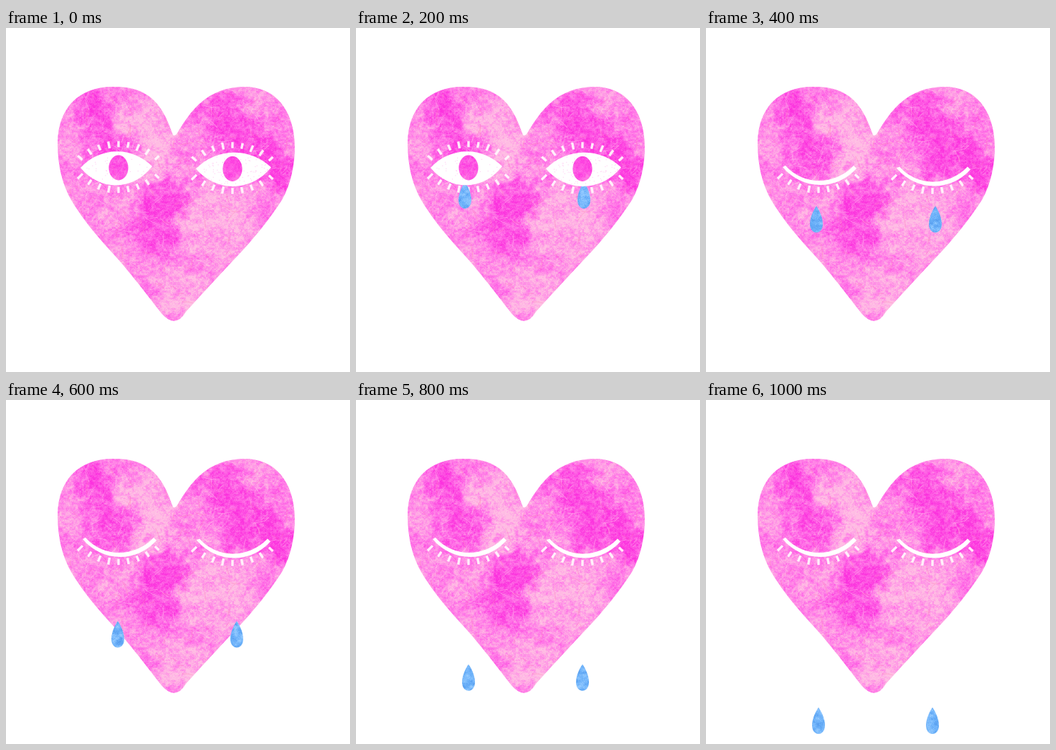
These frames come from a looping animation (480 px wide and 480 px high, 1200 ms). An HTML page with a canvas:

```html
<!DOCTYPE html>
<html lang="en">
<head>
<meta charset="utf-8">
<title>Crying heart</title>
<style>
  html, body { margin: 0; width: 100%; height: 100%; overflow: hidden; background: #fff; }
  canvas { display: block; width: 100vw; height: 100vh; }
</style>
</head>
<body>
<canvas id="stage" width="480" height="480"></canvas>
<script>
const start = performance.now();
const SIZE = 480, HOLD = 200, POSES = 6, TAU = Math.PI * 2;
const ctx = document.getElementById('stage').getContext('2d');

const HEART = new Path2D(
  'M233 149 C221 116 207 82 152 82 C103 81 73 110 72 160 C72 193 79 219 91 240 ' +
  'C108 269 132 296 154 320 C178 347 198 374 216 397 Q236 421 251 396 ' +
  'C274 370 298 345 322 319 C344 296 367 268 385 240 C398 217 403 190 403 165 ' +
  'C402 113 375 82 333 82 C279 82 256 119 240 145 Q236 152 233 149 Z');
const DROP = new Path2D('M0 0 C3 4 9 15 9 25 C9 41 -9 41 -9 25 C-9 15 -3 4 0 0 Z');
const SHUT = new Path2D('M-51.5 0 L-47.5 -2 C-23 26 21 26 47.5 -2 L51.5 2 C24 33 -24 33 -51.5 0 Z');

// x: iris, mid and half: lids, y: corner height
const EYES = [
  { x: 157, mid: 154, half: 50, y: 195, specks: 45 },
  { x: 316, mid: 317.5, half: 52.5, y: 196.5, specks: 130 }
];

// Blots of paint as x, y, radius
const HOT = [[125, 118, 27], [148, 170, 36], [222, 238, 32], [302, 120, 31],
  [335, 170, 38], [203, 286, 27], [385, 205, 25]];
const PALE = [[192, 138, 38], [205, 185, 25], [295, 272, 52], [245, 370, 34]];

const PINK = [[255, 190, 227], [255, 120, 231], [252, 50, 222]];
const BLUE = [[150, 203, 255], [106, 176, 249], [76, 146, 230]];

const mix = (a, b, t) => a + (b - a) * t;
const clamp = v => Math.min(1, Math.max(0, v));

function hash(x, y) {
  let h = Math.imul(x, 374761393) + Math.imul(y, 668265263);
  h = Math.imul(h ^ (h >>> 13), 1274126177);
  return ((h ^ (h >>> 16)) >>> 0) / 4294967296;
}

// Smooth noise from -0.5 to 0.5
function noise(x, y) {
  const i = Math.floor(x), j = Math.floor(y);
  let u = x - i, v = y - j;
  u *= u * (3 - 2 * u);
  v *= v * (3 - 2 * v);
  return mix(mix(hash(i, j), hash(i + 1, j), u), mix(hash(i, j + 1), hash(i + 1, j + 1), u), v) - .5;
}

function layer(draw) {
  const c = document.createElement('canvas');
  c.width = c.height = SIZE;
  draw(c.getContext('2d'));
  return c;
}

// Mottled paint; tone(x, y) runs from 0 (pale) to 1 (deep)
function paint(tone, ramp) {
  return layer(g => {
    const img = g.createImageData(SIZE, SIZE);
    for (let y = 0, k = 0; y < SIZE; y++) {
      for (let x = 0; x < SIZE; x++, k += 4) {
        const t = clamp(tone(x, y)) * 2, n = t < 1 ? 0 : 1;
        for (let c = 0; c < 3; c++) img.data[k + c] = mix(ramp[n][c], ramp[n + 1][c], t - n);
        img.data[k + 3] = 255;
      }
    }
    g.putImageData(img, 0, 0);
  });
}

function blots(list, x, y) {
  let sum = 0;
  for (const [bx, by, r] of list) {
    const d = ((x - bx) ** 2 + (y - by) ** 2) / (r * r);
    if (d < 2) sum += (1 - d / 2) ** 2 * (1 + d);
  }
  return Math.min(1, sum);
}

function pinkTone(x, y) {
  const wx = x + 24 * noise(x / 14, y / 14 + 50) + 8 * noise(x / 4, y / 4);
  const wy = y + 24 * noise(x / 14 + 70, y / 14) + 8 * noise(x / 4 + 30, y / 4);
  return .39 + .36 * blots(HOT, wx, wy) - .27 * blots(PALE, wx, wy)
    + .3 * noise(x / 20, y / 16) + .3 * noise(x / 7 + 9, y / 6)
    + .38 * noise(x / 2.8, y / 2.4 + 31) + .26 * (hash(x, y) - .5);
}

const blueTone = (x, y) => .4 + .7 * noise(x / 5, y / 4) + .35 * (hash(x, y) - .5);

// Thin fibres in the paper
function fibres(g) {
  g.lineWidth = .8;
  for (let i = 0; i < 420; i++) {
    const x = 70 + 335 * hash(i, 1), y = 80 + 330 * hash(i, 2);
    const a = TAU * hash(i, 3), b = a + 1.4 * hash(i, 5) - .7, r = 3 + 8 * hash(i, 4);
    g.strokeStyle = i % 3 ? 'rgba(255,210,234,.5)' : 'rgba(255,125,170,.45)';
    g.beginPath();
    g.moveTo(x, y);
    g.quadraticCurveTo(x + r * Math.cos(a), y + r * Math.sin(a),
      x + r * (Math.cos(a) + Math.cos(b)), y + r * (Math.sin(a) + Math.sin(b)));
    g.stroke();
  }
}

// Nine lashes along a parabola, fanned out from a point beyond the eye
function lashes(g, { x, y }, side) {
  const focus = y + (side < 0 ? 35 : -40);
  const reach = side < 0 ? 33 : 31;
  g.lineWidth = 3.4;
  g.strokeStyle = 'rgba(255,248,253,.92)';
  for (let i = -4; i <= 4; i++) {
    const lx = x + 13.4 * i, ly = y + side * (reach - 1.2 * i * i);
    const a = Math.atan2(ly - focus, lx - x);
    const r = 3.8 + 1.4 * hash(i + 9, reach);
    const dx = r * Math.cos(a), dy = r * Math.sin(a);
    g.beginPath();
    g.moveTo(lx - dx, ly - dy);
    g.lineTo(lx + dx, ly + dy);
    g.stroke();
  }
}

function lids({ mid, half, y }) {
  const p = new Path2D(), inner = half * .45;
  p.moveTo(mid - half, y);
  p.bezierCurveTo(mid - inner, y - 30, mid + inner, y - 30, mid + half, y - 2);
  p.bezierCurveTo(mid + inner, y + 33, mid - inner, y + 33, mid - half, y);
  return p;
}

function openEye(g, eye) {
  lashes(g, eye, -1);
  lashes(g, eye, 1);
  const iris = new Path2D(), white = lids(eye);
  iris.ellipse(eye.x, eye.y, 13.5, 17.5, 0, 0, TAU);
  white.addPath(iris);
  g.fillStyle = '#fff';
  g.fill(white, 'evenodd');
  g.fillStyle = 'rgba(252,60,222,.35)';
  g.fill(iris);
  g.save();
  g.clip(lids(eye));
  g.fillStyle = 'rgba(255,140,225,.5)';
  for (let i = 0; i < eye.specks; i++) {
    g.fillRect(eye.mid + 96 * (hash(i, 21) - .5), eye.y + 42 * (hash(i, 22) - .5), 1, 1);
  }
  g.restore();
}

function shutEye(g, eye) {
  lashes(g, eye, 1);
  g.save();
  g.translate(eye.x + 1.5, eye.y - 1);
  g.fillStyle = '#fff';
  g.fill(SHUT);
  g.restore();
}

const pink = paint(pinkTone, PINK), blue = paint(blueTone, BLUE);

function face(drawEye) {
  return layer(g => {
    g.fillStyle = '#fff';
    g.fillRect(0, 0, SIZE, SIZE);
    g.clip(HEART);
    g.drawImage(pink, 0, 0);
    fibres(g);
    EYES.forEach(eye => drawEye(g, eye));
  });
}

const awake = face(openEye), asleep = face(shutEye);

function tear(x, y, cover) {
  ctx.save();
  if (cover) {
    const below = new Path2D('M0 0H480V480H0Z');
    below.addPath(cover);
    ctx.clip(below, 'evenodd');
  }
  ctx.translate(x, y);
  ctx.clip(DROP);
  ctx.drawImage(blue, -x, -y);
  ctx.restore();
}

function frame() {
  const pose = Math.floor((performance.now() - start) / HOLD) % POSES;
  const open = pose < 2;
  ctx.drawImage(open ? awake : asleep, 0, 0);
  if (pose > 0) {
    // Steady fall with a slight drift; the tears draw closer once past the cheeks
    const x = Math.min(157, 150 + 2 * pose);
    const y = Math.max(215, 128 + 60.2 * pose);
    const gap = pose < 4 ? 166 : 159;
    EYES.forEach((eye, i) => tear(x + gap * i, y, open && lids(eye)));
  }
  requestAnimationFrame(frame);
}
frame();
</script>
</body>
</html>
```
